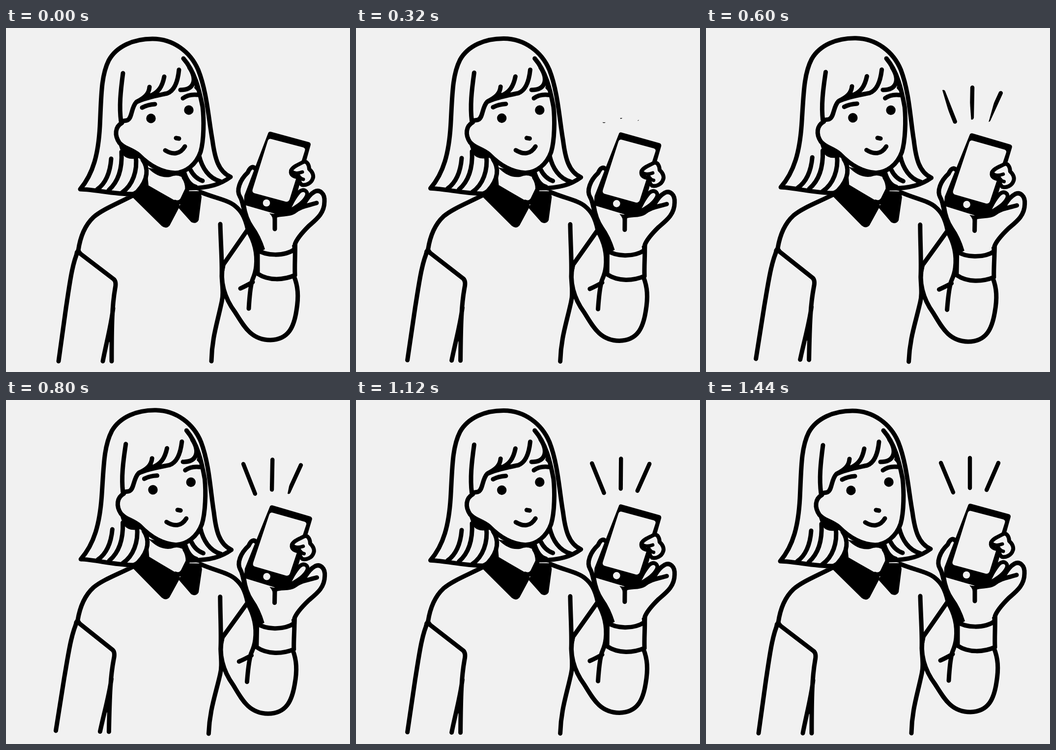
Animation, 700 px wide and 700 px high, one loop 1.52 s. Source, as an HTML page with a canvas:

```html
<!DOCTYPE html>
<html>
<head>
<meta charset="utf-8">
<style>
  html, body { margin: 0; overflow: hidden; background: #f1f1f1; }
  canvas { display: block; }
</style>
</head>
<body>
<canvas id="stage" width="700" height="700"></canvas>
<script>
const ctx = document.getElementById('stage').getContext('2d');
const PAPER = '#f1f1f1', INK = '#000';
const LOOP = 1520, SWAY = 1440, STEP = 40;

const lines = new Path2D(`
  M151 328C178 296 188 255 191 200C194 140 193 98 209 66C225 37 260 22 298 22
  C340 22 375 48 391 85C409 130 412 185 420 228C425 265 432 292 457 303C438 317 415 326 372 326
  M151 328C185 329 215 338 258 338
  M361 62C384 88 393 125 400 160C403 185 403 228 396 252C387 278 366 294 344 295C318 294 292 280 270 258C256 246 240 245 231 234
  C220 218 222 201 236 193
  M238 92C233 130 230 160 234 190L246 188C257 185 254 163 265 151C285 141 310 137 328 133C344 127 350 106 352 85
  M292 120C291 134 282 142 266 150M322 99C318 120 310 131 294 138
  M373 80C389 104 384 126 355 126
  M277 162Q288 156 303 155M360 143Q372 134 390 136
  M324 249C339 258 354 258 364 241M346 224L352 225
  M214 266C212 295 202 317 186 328M235 252C237 290 226 315 209 330
  M264 260C268 290 258 320 236 335M278 268C290 285 290 308 268 332
  M362 304Q369 314 369 328L359 349Q353 358 344 354
  M362 292C367 309 374 320 386 323M375 288C382 302 391 308 400 311M393 260C399 285 413 306 436 312
  M256 342C225 358 195 370 178 385C160 402 151 425 147 453C134 480 129 525 122 570L107 678
  M147 456L219 511Q225 516 222 530C216 565 215 600 215 678M218 570C214 605 205 637 197 678
  M396 334C425 346 452 350 466 362C477 371 486 382 492 410L444 479
  M436 399C437 440 440 475 439 505C440 525 443 540 439 557C430 600 419 630 418 678
  M442 482C434 515 445 550 466 578C484 606 498 635 538 635C575 634 586 608 591 575C596 545 594 525 586 505
  M492 412C508 438 511 465 509 485C507 505 500 512 500 518C496 535 495 555 494 571M477 530Q488 525 502 517
  M513 452C528 463 565 466 588 450M512 452V500C535 515 565 513 588 503C587 480 589 462 588 440
  M507 286C500 279 495 287 492 294C476 309 468 330 476 343C482 352 483 368 492 396
  M588 440C592 428 606 413 616 403C632 389 648 377 648 353C649 336 638 328 628 333C617 339 612 349 606 358
  M632 356C612 362 600 363 586 374C575 381 560 377 548 382
  M547 409V386`);

const shadows = new Path2D(`
  M372 82L399 140L383 122Q388 103 372 82Z
  M226 224L246 241L264 250L277 264L262 266Q246 268 238 258Q232 250 226 224Z
  M264 150L290 128L298 138Z
  M288 284Q310 307 334 303Q352 295 366 310L366 290L344 296Z
  M288 300L290 320L262 338L244 340Q280 326 288 300Z
  M366 308L370 332L398 332L384 320Z
  M248 342L286 318L312 333L342 350Q350 355 354 362L333 402Q326 410 317 403L258 345Z
  M351 366L362 345L371 326L396 332L398 344L392 391Q387 400 377 395Z
  M218 570L209 610L205 640L214 638Z
  M140 455L147 445L157 460Q143 459 137 474Z
  M474 345L488 360Q492 386 504 403Q518 422 527 450L510 460L494 416L484 388Z
  M436 478L448 476L443 500L442 525L446 548L437 556Z
  M536 377L556 380Q549 385 551 396L543 396Q545 386 536 377Z
  M582 442L593 436L592 462L584 460Z`);

const phone = new Path2D('M538 216L615 237L577 373L548 373L489 356L490 342Z');
const screen = new Path2D('M540 226L605 243Q610 245 608 250L577 349Q574 355 568 353L505 336Q500 334 502 328L532 232Q534 224 540 226Z');
const fingers = new Path2D(`
  M573 375C578 360 588 343 596 334C605 325 616 332 612 342C606 355 594 362 573 375Z
  M580 290C584 281 598 277 604 273C613 268 617 281 617 287C624 293 627 301 624 307C621 316 610 321 602 319Q595 314 597 304
  C587 303 578 300 580 290Z`);
const knuckles = new Path2D('M580 290Q587 299 603 293M595 300Q599 307 605 308');

// x1, y1, x2, y2, then where the wipe edge starts at the top and the bottom
const rays = [
  [478, 128, 503, 188, 4, -5],
  [537, 118, 537, 179, -1, -1],
  [595, 128, 571, 183, 0, 0]
];

const clamp = v => Math.max(0, Math.min(1, v));

function stroke(path, width = 9) {
  ctx.lineWidth = width;
  ctx.stroke(path);
}

function dot(x, y, r, color) {
  ctx.fillStyle = color;
  ctx.beginPath();
  ctx.arc(x, y, r, 0, 7);
  ctx.fill();
}

function drawRay([x1, y1, x2, y2, top, bottom], t) {
  const growth = clamp((t - 317) / 155);
  if (!growth) return;
  const left = x1 + top - 14 * clamp((t - 480) / 250);
  const foot = x2 + bottom - 12 * clamp((t - 480) / 480) ** 4;
  ctx.save();
  ctx.beginPath();
  ctx.rect(0, y2 + 4 - growth * (y2 - y1 + 10), 700, 700);
  ctx.clip();
  ctx.beginPath();
  ctx.moveTo(left, y1 - 6);
  ctx.lineTo(700, y1 - 6);
  ctx.lineTo(700, y2 + 6);
  ctx.lineTo(foot, y2 + 6);
  ctx.clip();
  stroke(new Path2D(`M${x1} ${y1}L${x2} ${y2}`), 8.4);
  ctx.restore();
}

function draw(t) {
  ctx.fillStyle = PAPER;
  ctx.fillRect(0, 0, 700, 700);
  ctx.save();
  const sway = t < SWAY ? (1 - Math.cos(2 * Math.PI * t / SWAY)) / 2 : 0;
  ctx.translate(364, 388);
  ctx.rotate(0.02 * sway);
  ctx.translate(-364, -388);
  ctx.lineCap = ctx.lineJoin = 'round';
  ctx.strokeStyle = ctx.fillStyle = INK;

  stroke(lines);
  ctx.fill(shadows);
  dot(295, 184, 9.7, INK);
  dot(372, 167, 9.7, INK);

  ctx.fill(phone);
  stroke(phone, 10);
  ctx.fillStyle = PAPER;
  ctx.fill(screen);
  ctx.fill(fingers);
  stroke(fingers, 8);
  stroke(knuckles, 7);
  dot(530, 356, 7.3, PAPER);

  for (const ray of rays) drawRay(ray, t);
  ctx.restore();
}

function tick() {
  const t = performance.now() % LOOP;
  draw(Math.floor(t / STEP) * STEP);
  requestAnimationFrame(tick);
}
tick();
</script>
</body>
</html>
```
